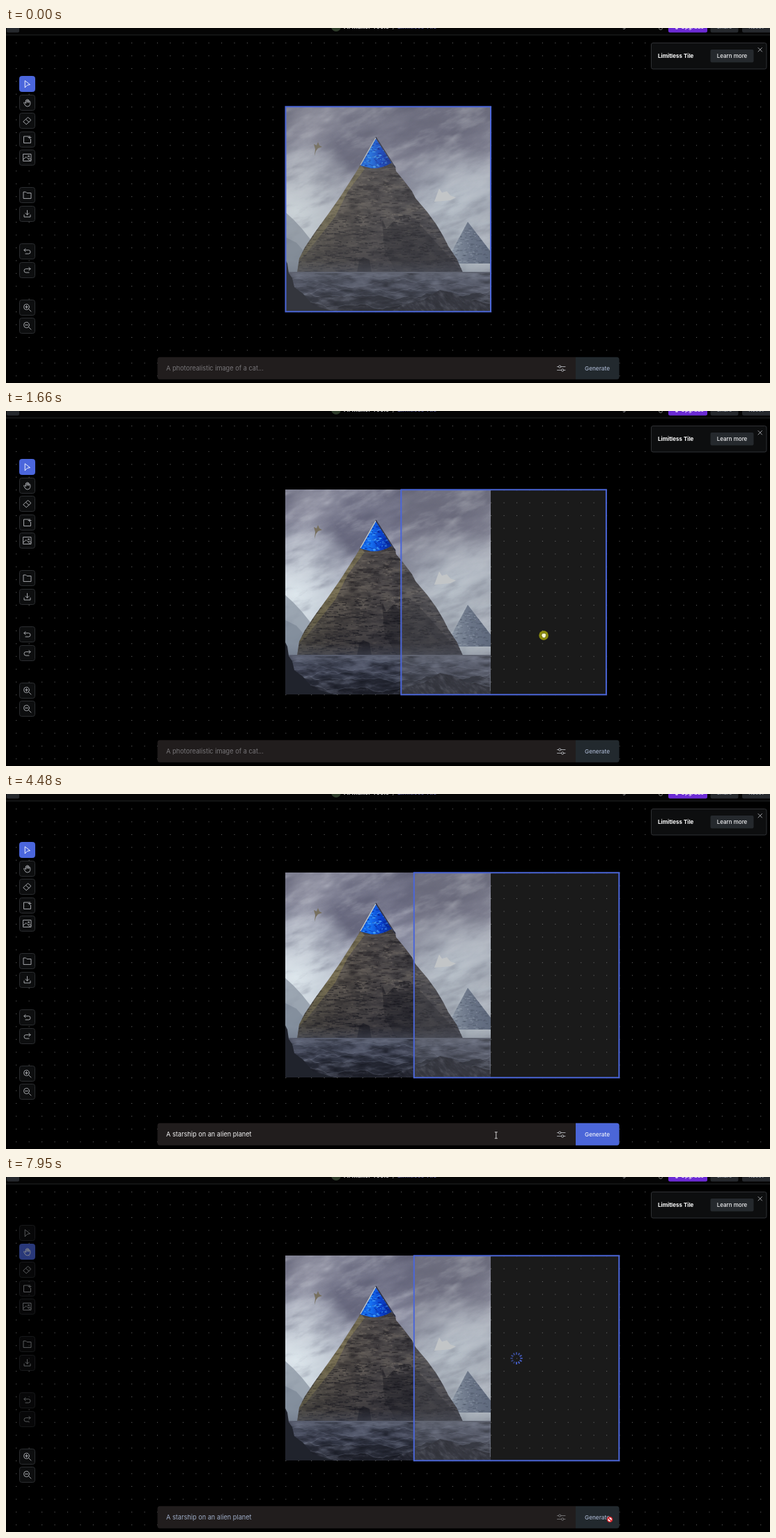
These frames come from a looping animation (1097 px wide and 511 px high, 8 s). An HTML page with a canvas:

```html
<!DOCTYPE html>
<html lang="en">
<head>
<meta charset="utf-8">
<title>Image canvas</title>
<style>
  html, body { margin: 0; width: 100%; height: 100%; overflow: hidden; background: #000; }
  canvas, svg { position: absolute; left: 0; top: 0; }
  text { font: 500 8px Inter, sans-serif; }
  .icon { fill: none; stroke: #b4b6ba; stroke-width: .9; stroke-linejoin: round; stroke-linecap: round; }
  .tool rect { fill: #0d0e0f; stroke: #2b2d30; }
  .tool.on rect { fill: #4b66dc; stroke: #4b66dc; }
  .tool.on .icon { stroke: #fff; }
</style>
</head>
<body>
<canvas id="stage" width="1097" height="511"></canvas>
<svg width="1097" height="511" viewBox="0 0 1097 511">
  <rect width="1097" height="10" fill="#050505"/>
  <rect y="9.5" width="1097" height="1" fill="#222427"/>
  <rect x="1" y="-12" width="18" height="18.5" rx="2" fill="#26292d"/>
  <circle cx="474" cy="-2" r="7" fill="#2f3d2b"/>
  <text x="485" y="1.3" fill="#d0d0d6" style="font-size:9px;font-weight:700">AI Maker Tools</text>
  <text x="555" y="1.3" fill="#aaa" style="font-size:9px">/</text>
  <text x="562" y="1.3" fill="#5b5d92" style="font-size:8.8px;font-weight:700">Limitless Tile</text>
  <text x="868" y="-.5" fill="#b9b9bd">Using 25 credits</text>
  <circle cx="940" cy="0" r="2.5" fill="none" stroke="#999" stroke-width=".8"/>
  <rect x="951" y="-12" width="56" height="18.5" rx="2.5" fill="#6c2bd4"/>
  <rect x="1011.5" y="-12" width="40" height="18.5" rx="2.5" fill="#26292d"/>
  <rect x="1057" y="-12" width="42" height="18.5" rx="2.5" fill="#26292d"/>
  <circle cx="963" cy="0" r="2" fill="#d8c8f5"/>
  <text x="969" y="1" fill="#fff">Upgrade</text>
  <text x="1031.5" y="1" fill="#9aa0ac" text-anchor="middle">Share</text>
  <text x="1077" y="1" fill="#9aa0ac" text-anchor="middle">Reset</text>

  <rect x="926.5" y="21.5" width="165.5" height="37.5" rx="2.5" fill="#0d0e0f" stroke="#2f3134"/>
  <text x="936" y="43.3" fill="#fff" style="font-weight:700">Limitless Tile</text>
  <rect x="1011.5" y="31" width="62" height="18.5" rx="2" fill="#25292d"/>
  <text x="1042.5" y="43.3" fill="#f2f2f4" text-anchor="middle">Learn more</text>
  <path class="icon" d="M1080 28.5l5.5 5.5m0-5.5l-5.5 5.5"/>

  <g id="tools"></g>
  <rect id="frame" y="113.3" width="294.5" height="295" fill="#808080" fill-opacity=".2" stroke="#4b66d8" stroke-width="2"/>
  <g id="spinner" transform="translate(733 261)" stroke="#4b66d8" stroke-width="1.8"></g>

  <path d="M818 473.7H221q-3.5 0-3.5 3.5v25q0 3.5 3.5 3.5H818z" fill="#211d1d"/>
  <path id="idle" d="M818 473.7h59q3.5 0 3.5 3.5v25q0 3.5-3.5 3.5h-59z" fill="#22292e"/>
  <path id="ready" d="M818 473.7h59q3.5 0 3.5 3.5v25q0 3.5-3.5 3.5h-59z" fill="#4b66d8"/>
  <text id="prompt" x="230" y="493.2" style="font-size:9.2px;font-weight:400"></text>
  <rect id="caret" y="485" width="1" height="10" fill="#fff"/>
  <g id="sliders" class="icon">
    <path d="M791.5 487.5H793.5M797 487.5H803M791.5 492.5H797.5M801 492.5H803"/>
    <circle cx="795.2" cy="487.5" r="1.7"/><circle cx="799.2" cy="492.5" r="1.7"/>
  </g>
  <text id="label" x="849" y="493.2" text-anchor="middle" style="font-size:8.2px">Generate</text>

  <g id="cursor">
    <path data-kind="arrow" d="M0 0V13L3 10.2 5 14.7 7 13.8 5 9.5H9.2Z" fill="#fff" stroke="#000" stroke-width=".8"/>
    <path data-kind="open" d="M-4 0L-2.5 1V-4H-1V-5.5H.5V-4.5H2V-3H3.5V2.5L2 5.5H-2Z" fill="#fff" stroke="#000" stroke-width=".7"/>
    <g data-kind="grab">
      <circle r="6.8" fill="#ff0" fill-opacity=".5"/>
      <path d="M-3.2 0L-2.2-2.8 1.8-3 3.3-1.5V1L1.8 3.5H-1.3Z" fill="#fbfbd8" stroke="#55550a" stroke-width=".6"/>
    </g>
    <path data-kind="beam" d="M-2-4.5H2M0-4.5V4.5M-2 4.5H2" stroke="#ddd" stroke-width=".9"/>
    <path data-kind="finger" d="M-1-3Q0-4 1-3V1L4.5 2.2V6.5L3.5 10H-1.5L-4.5 4.5-3 3.5-1 5Z" fill="#fff" stroke="#000" stroke-width=".7"/>
    <g data-kind="no">
      <circle r="3.5" fill="#fff" stroke="#d31f26" stroke-width="1.6"/>
      <path d="M-2.5-2.5L2.5 2.5" stroke="#d31f26" stroke-width="1.6"/>
    </g>
  </g>
</svg>
<script>
const $ = id => document.getElementById(id);
const LOOP = 8000, GRID = 18.43, LEFT = 401.5, SIDE = 295;

// --- Noise helpers ---
const hash = (x, y) => { const s = Math.sin(x * 127.1 + y * 311.7) * 43758.5453; return s - Math.floor(s); };
const ease = v => v * v * (3 - 2 * v);
function noise(x, y) {
  const i = Math.floor(x), j = Math.floor(y), u = ease(x - i), v = ease(y - j);
  const top = hash(i, j) * (1 - u) + hash(i + 1, j) * u;
  const low = hash(i, j + 1) * (1 - u) + hash(i + 1, j + 1) * u;
  return top * (1 - v) + low * v;
}
function fbm(x, y) {
  let sum = 0;
  for (let o = 0, a = .5; o < 5; o++, a /= 2, x = x * 2 + 7, y = y * 2 + 3) sum += a * noise(x, y);
  return sum;
}
let seed = 5;
const rnd = (a, b) => a + (b - a) * hash(seed++, 17);

function grain(fx, fy, dark, light, gain, slant = 0) {
  const c = document.createElement('canvas');
  c.width = c.height = SIDE;
  const g = c.getContext('2d'), img = g.createImageData(SIDE, SIDE);
  for (let y = 0, p = 0; y < SIDE; y++) for (let x = 0; x < SIDE; x++, p += 4) {
    const v = fbm(x / fx + fy, (y + x * slant) / fy + 9) - .48;
    img.data.set(v < 0 ? dark : light, p);
    img.data[p + 3] = Math.min(220, Math.abs(v) * gain);
  }
  g.putImageData(img, 0, 0);
  return c;
}

// --- Static scene ---
const g = $('stage').getContext('2d');

function gradient(x0, y0, x1, y1, ...stops) {
  const q = g.createLinearGradient(x0, y0, x1, y1);
  stops.forEach((s, i) => q.addColorStop(i / (stops.length - 1), s));
  return q;
}
function glow(x, y, r, rgb, a) {
  const q = g.createRadialGradient(x, y, 0, x, y, r);
  q.addColorStop(0, `rgba(${rgb},${a})`);
  q.addColorStop(1, `rgba(${rgb},0)`);
  g.fillStyle = q;
  g.fillRect(0, 0, SIDE, SIDE);
}
function poly(fill, d) {
  const p = new Path2D(d);
  g.fillStyle = fill;
  g.fill(p);
  return p;
}
function within(path, draw) {
  g.save();
  g.clip(path);
  draw();
  g.restore();
}
function dashes(n, x0, x1, y0, y1, color, size) {
  g.fillStyle = color;
  for (let i = 0; i < n; i++) g.fillRect(rnd(x0, x1), rnd(y0, y1), rnd(1, size), rnd(.6, 1.6));
}
function ridge(base, amp, color) {
  let d = `M0 ${SIDE}`;
  for (let x = 0; x <= SIDE; x += 2) d += `L${x} ${base - amp * (fbm(x / 34, base) - .4) * 2}`;
  return poly(color, d + `V${SIDE}Z`);
}

function paintDots() {
  g.fillStyle = 'rgba(255,255,255,.36)';
  for (let x = 14.3; x < 1097; x += GRID)
    for (let y = 21.1; y < 511; y += GRID) g.fillRect(x - .1, y - .1, 1.1, 1.1);
}

function paintSky() {
  g.fillStyle = gradient(0, 0, 0, 240, '#78798c', '#7d7e93', '#8b8ea2', '#aab4c1', '#b9c6d0');
  g.fillRect(0, 0, SIDE, SIDE);
  g.drawImage(grain(95, 45, [66, 66, 88], [196, 198, 210], 430, .3), 0, 0);
  glow(30, 22, 55, '200,201,210', .4);
  glow(220, 40, 95, '92,92,114', .5);
  glow(15, 150, 105, '224,234,239', .95);
  glow(30, 95, 60, '205,212,220', .45);
  glow(238, 140, 90, '208,220,230', .85);
  glow(285, 120, 60, '208,220,230', .5);
  g.drawImage(grain(30, 13, [84, 86, 108], [232, 236, 241], 230, .35), 0, 0);
  // Distant peaks, floating castle and flyer
  poly('rgba(138,149,162,.75)', 'M0 152L12 163 24 176 40 196V240H0Z');
  poly('rgba(112,124,140,.5)', 'M0 188L16 196 30 212V240H0Z');
  poly('#d2d6d8', 'M214 137L218 126 221 118 225 124 232 122 237 128 245 131 237 135 226 136Z');
  poly('#77705f', 'M41 54L45 56 47 51 49 56 53 58 47 60 44 64 42 71 43 61Z');
}

function paintPyramids() {
  const far = poly(gradient(231, 0, 295, 0, '#93a1b2', '#66738a', '#56637b'), 'M262 166L295 209V226H231L240 207Z');
  within(far, () => {
    dashes(160, 229, 295, 172, 230, 'rgba(48,58,78,.35)', 7);
    dashes(70, 229, 275, 178, 230, 'rgba(200,212,224,.3)', 5);
  });

  const body = poly(gradient(10, 0, 250, 0, '#66614f', '#57514a', '#4a4647', '#444246', '#45454e'),
    'M108 84L102 94 79 130 63 153 42 182 28 203 20 219 17 239H255L246 219 234 201 227 187 217 170 204 152 187 132 182 122 169 105 159 93 158 86 153 82 130 44Z');
  within(body, () => {
    g.drawImage(grain(16, 5, [16, 15, 21], [130, 122, 112], 360), 0, 0);
    dashes(420, 0, 260, 85, 160, 'rgba(20,18,23,.35)', 10);
    dashes(700, 0, 260, 155, 240, 'rgba(15,15,21,.5)', 9);
    dashes(330, 0, 250, 90, 238, 'rgba(152,143,128,.3)', 6);
    poly('rgba(178,164,96,.32)', 'M108 84L15 225 30 212 72 158 90 122 114 90Z');
    poly('rgba(22,20,26,.35)', 'M139 165L150 158 162 172 190 166 256 240H160L142 205Z');
    poly('rgba(135,128,121,.32)', 'M140 164L154 155 158 163 145 176Z');
    poly('rgba(18,18,24,.6)', 'M103 239L106 222 112 217 121 221 124 239Z');
    g.fillStyle = gradient(0, 150, 0, 240, 'rgba(34,34,44,0)', 'rgba(32,33,44,.5)');
    g.fillRect(0, 150, SIDE, 90);
  });

  const cap = poly(gradient(107, 0, 153, 0, '#0b56dc', '#1672f2', '#0a40cc', '#082a92'),
    'M130 46L153 81Q138 90 124 89L108 85Z');
  within(cap, () => {
    dashes(75, 108, 153, 56, 90, 'rgba(80,180,255,.7)', 5);
    dashes(75, 108, 153, 50, 90, 'rgba(5,20,130,.6)', 5);
  });
  g.lineWidth = 1.3;
  g.strokeStyle = '#c9d2d6';
  g.stroke(new Path2D('M130 45L108 84'));
  g.strokeStyle = '#292d42';
  g.stroke(new Path2D('M130 44L158 88'));
}

function paintGround() {
  g.fillStyle = gradient(0, 222, 0, 240, 'rgba(100,108,128,0)', 'rgba(90,97,116,.35)');
  g.fillRect(0, 222, SIDE, 18);
  g.fillStyle = gradient(0, 238, 0, 295, '#585d6e', '#414657', '#2b2e3b', '#1c1e27');
  g.fillRect(0, 238, SIDE, 57);
  ['#4b5062', '#414556', '#343847', '#282b37', '#20222c'].forEach((color, i) => {
    const p = ridge(247 + i * 10, 9 + i, color);
    g.strokeStyle = 'rgba(142,150,172,.3)';
    g.lineWidth = .8;
    g.stroke(p);
  });
  within(new Path2D('M0 240H295V295H0Z'), () => {
    g.drawImage(grain(18, 6, [10, 12, 19], [128, 135, 156], 380), 0, 0);
  });
  const mound = poly('#262833', 'M152 295L170 285 199 278 222 264 239 268 255 276 280 283 295 290V295Z');
  within(mound, () => g.drawImage(grain(7, 5, [12, 13, 19], [110, 113, 128], 300, -.6), 0, 0));
  poly('#20232c', 'M0 220L3 226 5 240 10 247 13 260 26 270 40 286 70 295H0Z');
}

paintDots();
g.save();
g.translate(401, 113);
g.beginPath();
g.rect(0, 0, SIDE, SIDE);
g.clip();
paintSky();
paintPyramids();
paintGround();
g.restore();

// --- Toolbar and spinner ---
const zoom = 'M3-1A4 4 0 1 1-5-1A4 4 0 1 1 3-1M2 2L5.5 5.5M-3-1H1';
const icons = [
  [69, 'M-3-4.5L4 1 0 1.8-3 5Z'],
  [96, 'M-4 2Q-6-.5-4-.5L-2 1V-3.5Q-1.2-4.8-.5-3.5V-.5M-.5-4Q.3-6 1-4V-.5M1-3.5Q2.5-5 2.5-3V0M2.5-2Q4.3-3 4.3-1V2Q4 5.5 0 5.5-2.5 5.5-4 2'],
  [122, 'M-5.5 1L1-5 5.5-1-1 5ZM-2-2L2.5 2'],
  [149, 'M2-4.5H-5V5H5V-.5M3.5-5V-1M1.5-3H5.5'],
  [175, 'M-5.5-5H5.5V5H-5.5ZM-5.5 2.5L-1.5-1 4.5 5M1.5 2L3 .5 5.5 3M1.5-2.5H3V-1.5H1.5Z'],
  [229, 'M-5.5 4.5V-4.5H-2L-.5-3H5.5V4.5Z'],
  [256, 'M0-5V1.5M-2.5-1L0 1.5 2.5-1M-4.5 1.5V4.5H4.5V1.5'],
  [310, 'M-2.5-4L-4.5-1.8-2.5 .4M-4.5-1.8H2Q4.5-1.8 4.5 .8T2 3.5H-2.5'],
  [337, 'M2.5-4L4.5-1.8 2.5 .4M4.5-1.8H-2Q-4.5-1.8-4.5 .8T-2 3.5H2.5'],
  [391, zoom + 'M-1-3V1'],
  [417, zoom]
];
$('tools').innerHTML = icons.map(([y, d]) =>
  `<g class="tool" transform="translate(30.5 ${y + 11.5})"><rect x="-11" y="-11" width="22" height="22" rx="3"/><path class="icon" d="${d}"/></g>`).join('');
const tools = [...$('tools').children];
$('spinner').innerHTML = Array.from({ length: 12 }, (_, i) => `<path d="M0-5.3V-8.7" transform="rotate(${i * 30})"/>`).join('');
const spokes = [...$('spinner').children];
const cursors = [...$('cursor').children];

// --- Motion ---
const path = [
  [70, 951, 446], [400, 765, 372], [760, 607, 326], [890, 609, 325], [1310, 727, 323], [1660, 772, 323],
  [2290, 796, 323], [2550, 796, 323], [2970, 461, 481], [3900, 461, 481], [4340, 640, 488],
  [4820, 857, 499], [5980, 858, 499], [6540, 859, 493], [6820, 867, 493]
];
function cursorAt(t) {
  const i = path.findIndex(k => k[0] > t);
  if (i < 0) return path[path.length - 1].slice(1);
  if (!i) return path[0].slice(1);
  const [a, b] = [path[i - 1], path[i]], u = (t - a[0]) / (b[0] - a[0]);
  return [1, 2].map(n => a[n] + (b[n] - a[n]) * u);
}
function cursorKind(t, x, y) {
  if (t < 70) return '';
  if (t >= 5220) return 'no';
  if (t >= 890 && t < 2600) return 'grab';
  if (y > 473) return x < 818 ? 'beam' : 'finger';
  return t < 890 && x < 697 ? 'open' : 'arrow';
}
const ramp = (t, from, span) => Math.max(0, Math.min(1, (t - from) / span));

function render(now) {
  const t = now % LOOP, [x, y] = cursorAt(t), busy = t >= 5220, typed = t >= 3590;

  const kind = cursorKind(t, x, y);
  $('cursor').setAttribute('transform', `translate(${x} ${y})`);
  cursors.forEach(c => c.style.display = c.dataset.kind === kind ? '' : 'none');

  const steps = t < 890 ? 0 : t > 2290 ? 10 : Math.round((x - 607) / GRID);
  $('frame').setAttribute('x', LEFT + steps * GRID);

  const prompt = $('prompt');
  prompt.textContent = typed ? 'A starship on an alien planet' : 'A photorealistic image of a cat...';
  prompt.setAttribute('fill', busy ? '#9eacc6' : typed ? '#f2f2f2' : '#777578');
  $('caret').setAttribute('x', typed ? 230.3 + prompt.getComputedTextLength() : 230);
  const blink = (t - (typed ? 3590 : 3250)) % 1060 < 530;
  $('caret').style.display = t >= 3250 && !busy && blink ? '' : 'none';

  const lit = ramp(t, 3590, 150) - ramp(t, 5800, 150);
  $('ready').style.opacity = lit;
  $('label').setAttribute('fill', lit > .6 ? '#eef1fb' : '#a3afc8');
  $('sliders').style.opacity = busy ? .6 : 1;

  tools.forEach((tool, i) => {
    tool.classList.toggle('on', i === (busy ? 1 : 0));
    tool.style.opacity = busy && i < 9 ? .55 : 1;
  });
  $('spinner').style.display = busy ? '' : 'none';
  const head = Math.floor(t / 100);
  spokes.forEach((s, i) => s.style.opacity = .45 + .55 * ((i - head + 1200) % 12) / 11);
  requestAnimationFrame(render);
}
render(0);
</script>
</body>
</html>
```
